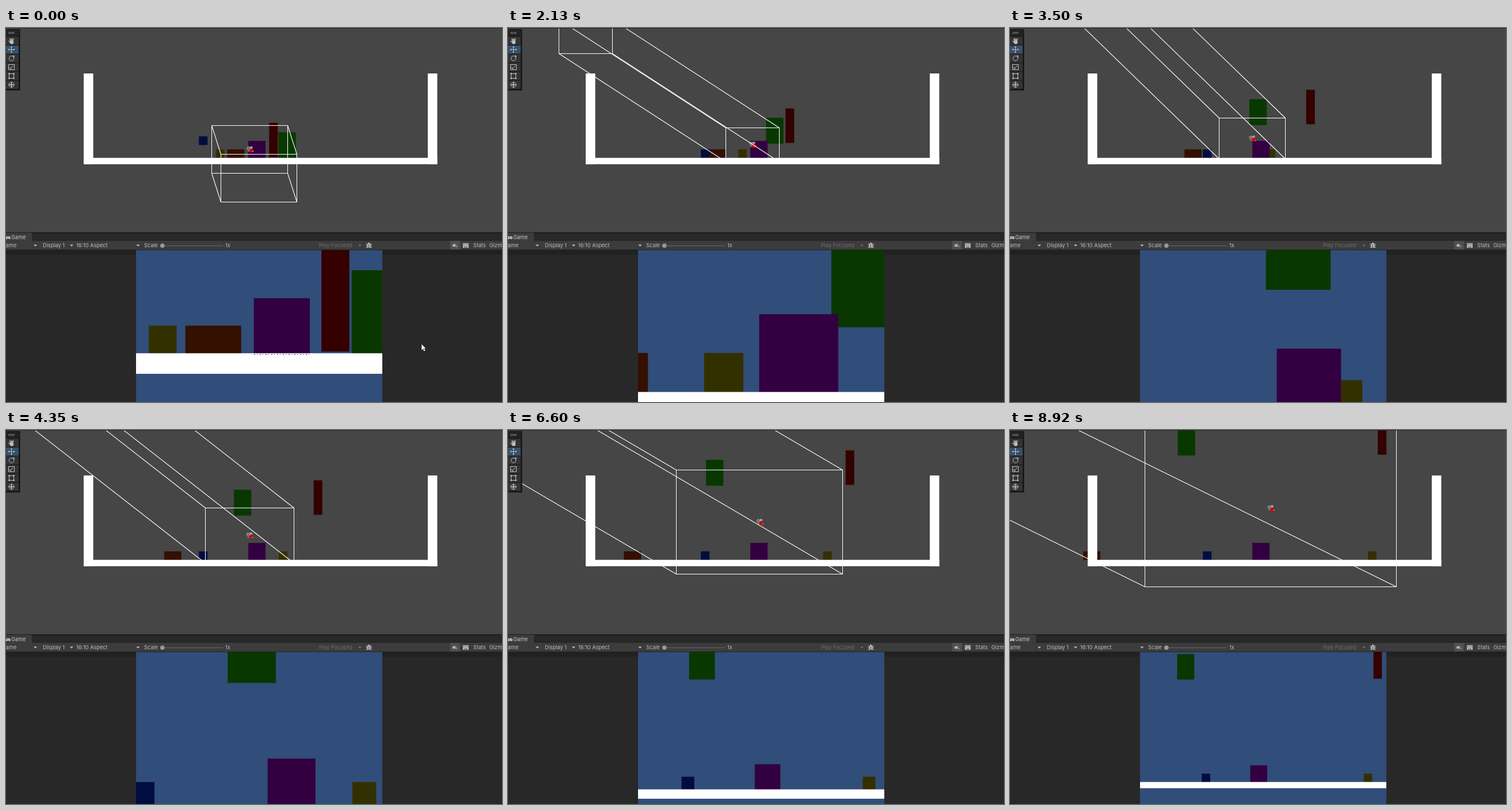
An HTML page with a canvas that plays this animation: 862 by 650 pixels, repeating every 8.96 s.

```html
<!DOCTYPE html>
<html lang="en">
<head>
<meta charset="utf-8">
<title>Camera follow</title>
<style>
  html, body { margin: 0; width: 100%; height: 100%; overflow: hidden; background: #282828; }
  canvas { display: block; }
</style>
</head>
<body>
<canvas id="stage" width="862" height="650"></canvas>
<script>
const ctx = document.getElementById('stage').getContext('2d');
const LOOP = 8960, HOLD = 1120, START = 1085;
const SPRITE_DEPTH = 0.01; // share of the far-plane shift seen at the sprites
const INK = '#bdbdbd', DIM = '#6d6d6d', BAR = '#3c3c3c';

// falls from 1 to 0 over about `span` ms; a higher power starts more gently
const fade = (t, span, power) => Math.exp(-((t / span) ** power));

// The camera settles into a steady drift and zoom that trail the moving blocks.
function pose(time) {
  const t = time < HOLD ? 0 : time - START;
  const travel = t * (0.034 - 1.5e-7 * t);
  return {
    travel,
    x: 399 + 0.21 * travel + 24.8 * fade(t, 1900, 2),
    y: 218.5 - 0.321 * travel - 7.5 * fade(t, 1400, 2),
    width: 2 * travel - 78.5 + 210.5 * fade(t, 1370, 1.15),
    dx: -910 + 926 * fade(t, 2137, 1.28),
    dy: -678 + 0.0296 * t + 728 * fade(t, 1354, 3)
  };
}

function box(x, y, w, h, color) {
  ctx.fillStyle = color;
  ctx.fillRect(x, y, w, h);
}

function clipped(x, y, w, h, paint) {
  ctx.save();
  ctx.beginPath();
  ctx.rect(x, y, w, h);
  ctx.clip();
  paint();
  ctx.restore();
}

function stroke(points, color, width = 1) {
  ctx.beginPath();
  points.forEach(([x, y]) => ctx.lineTo(x, y));
  ctx.strokeStyle = color;
  ctx.lineWidth = width;
  ctx.stroke();
}

function fill(points, color) {
  ctx.beginPath();
  points.forEach(([x, y]) => ctx.lineTo(x, y));
  ctx.fillStyle = color;
  ctx.fill();
}

function disc(x, y, r, color) {
  ctx.beginPath();
  ctx.arc(x, y, r, 0, 7);
  ctx.fillStyle = color;
  ctx.fill();
}

function ring(x, y, r, color) {
  ctx.beginPath();
  ctx.arc(x, y, r, 0, 7);
  ctx.strokeStyle = color;
  ctx.lineWidth = 1;
  ctx.stroke();
}

function label(text, x, color = INK, y = 381.3) {
  ctx.font = '9.2px Inter, Arial, sans-serif';
  ctx.fillStyle = color;
  ctx.fillText(text, x, y);
}

function world(travel) {
  const diag = travel * Math.SQRT1_2;
  box(457.3 + diag, 164.8 - diag, 15, 60, '#340000');
  box(473.5 - diag, 181.2 - diag, 30.2, 45, '#083800');
  box(364.8 + travel, 210.9, 14.9, 15, '#333000');
  box(384.4 - travel, 210.9, 29.9, 15, '#331000');
  box(335.2, Math.min(188.4 + travel, 210.9), 15, 15, '#000d40');
  box(421.1, 196.2, 30, 30, '#320040');
  box(135, 225.7, 614.5, 11, '#fff');
  box(135, 79, 16.6, 157.7, '#fff');
  box(733, 79, 16.5, 157.7, '#fff');
}

function frustum({ x, y, width, dx, dy }) {
  const snap = v => Math.round(v - 0.5) + 0.5;
  const corners = (cx, cy) => [[-1, -1], [1, -1], [1, 1], [-1, 1]]
    .map(([i, j]) => [snap(cx + i * width / 2), snap(cy + j * width / 3.2)]);
  const near = corners(x, y), far = corners(x + dx, y + dy);
  stroke([...near, near[0]], '#fff');
  stroke([...far, far[0]], '#fff');
  near.forEach((p, i) => stroke([p, far[i]], '#fff', 1.1));
}

function cameraIcon(x, y) {
  disc(x - 3, y - 2, 3, '#8d8d8d');
  disc(x + 2, y - 3, 2.4, '#a5a5a5');
  box(x - 4, y - 1, 6, 5, '#777');
  disc(x - 3, y - 2, 1, '#444');
  fill([[x - 2, y + 2], [x + 2, y - 2], [x + 6, y + 1], [x + 5, y + 4], [x + 1, y + 6]], '#d80000');
  box(x + 4, y + 3, 2, 1, '#ddd');
}

function cross(x, y, r, color) {
  stroke([[x - r, y], [x + r, y]], color);
  stroke([[x, y - r], [x, y + r]], color);
}

function toolStrip() {
  const ink = '#bebebe', x = 9.5, row = i => 22.2 + i * 15.3;
  box(0, 2, 24.5, 106.5, '#151515');
  box(0, 3, 23, 11, '#222');
  box(4, 7, 11, 1, '#777');
  box(4, 9, 11, 1, '#777');
  for (let i = 0; i < 6; i++) box(0, row(i) - 7.2, 22, 14.3, i === 1 ? '#36516c' : '#343434');
  // hand
  disc(x + 0.5, row(0) + 2.5, 3.2, ink);
  for (let i = 0; i < 4; i++) stroke([[x - 1 + i, row(0) + 2], [x - 3 + i * 2.2, row(0) - 4]], ink, 1.3);
  stroke([[x - 1, row(0) + 4], [x - 5, row(0)]], ink, 1.3);
  // move
  cross(x, row(1), 5, ink);
  for (let i = 0; i < 4; i++) {
    ctx.save();
    ctx.translate(x, row(1));
    ctx.rotate(i * Math.PI / 2);
    fill([[6, 0], [4, -2], [4, 2]], ink);
    ctx.restore();
  }
  // rotate
  ring(x, row(2), 4.2, ink);
  fill([[x + 2, row(2) - 5], [x + 5, row(2) - 5], [x + 5, row(2) - 1]], ink);
  // scale
  ctx.strokeRect(4.5, 63.5, 10, 9);
  ctx.strokeRect(4.5, 69.5, 4, 3);
  stroke([[9, 69], [12.5, 65.5]], ink);
  // rect
  ctx.strokeRect(5.5, 79.5, 8, 8);
  for (const cx of [5.5, 13.5]) for (const cy of [79.5, 87.5]) disc(cx, cy, 1.4, ink);
  // transform
  ring(x, row(5), 4.5, ink);
  cross(x, row(5), 5.5, ink);
  ring(x, row(5), 1.8, ink);
}

function gameBar() {
  const arrow = (x, color = INK) => fill([[x - 3, 376.5], [x + 3, 376.5], [x, 379.8]], color);
  box(0, 355, 862, 15, '#282828');
  box(0, 355, 862, 2, '#1c1c1c');
  box(0, 357, 45, 13, BAR);
  box(0, 356, 45, 1, '#28425c');
  box(0, 370, 862, 15, BAR);
  box(0, 385, 862, 1, '#232323');
  // gamepad
  box(0, 362, 7, 4, INK);
  disc(1, 365, 2, INK);
  disc(6, 365, 2, INK);
  box(1, 363, 2, 1, BAR);
  box(5, 363, 1, 1, BAR);
  label('Game', 9, '#c8c8c8', 367.3);
  label('Game', -7);
  label('Display 1', 64);
  label('16:10 Aspect', 122);
  label('Scale', 240);
  label('1x', 381);
  label('Play Focused', 544, DIM);
  label('Stats', 812);
  label('Gizmos', 840);
  [51, 114, 229.5].forEach(x => arrow(x));
  arrow(615, DIM);
  box(272, 378, 105, 1, '#686868');
  disc(271.8, 378.3, 3.8, '#999');
  // bug
  disc(630.7, 378.5, 3.2, INK);
  disc(630.7, 374.7, 1.8, INK);
  for (let y = 375.5; y < 382; y += 3) stroke([[625.5, y], [636, y]], INK);
  stroke([[630.5, 376], [630.5, 382]], BAR);
  // mute
  box(772, 370, 17, 15, '#505050');
  box(776, 376.5, 2, 3, INK);
  fill([[777, 377], [780.5, 374.5], [780.5, 381], [777, 379]], INK);
  stroke([[782, 376], [782, 380]], INK);
  stroke([[783, 381], [785, 379]], INK);
  // keyboard
  box(794, 374, 10, 8, INK);
  for (let i = 0; i < 8; i++) box(795 + (i % 4) * 2.3, i < 4 ? 375 : 377, 1, 1, BAR);
  box(796, 380, 6, 1, BAR);
}

function pointer(x, y) {
  const tip = [x, y];
  stroke([[x + 3, y + 7], [x + 5.5, y + 12]], '#fff', 2.2);
  const head = [tip, [x, y + 11.5], [x + 3, y + 8.8], [x + 8, y + 8.2], tip];
  fill(head, '#fff');
  stroke(head, '#111', 0.6);
}

function sceneView(view) {
  box(0, 0, 862, 355, '#464646');
  world(view.travel);
  cameraIcon(view.x + 0.5, view.y);
  frustum(view);
  box(0, 0, 862, 1, '#2a2a2a');
  toolStrip();
}

function gameView({ travel, x, y, width, dx, dy }) {
  const zoom = 428 / width;
  box(226, 386, 428, 264, '#314d79');
  ctx.translate(440, 519.25);
  ctx.scale(zoom, zoom);
  ctx.translate(-x - dx * SPRITE_DEPTH, -y - dy * SPRITE_DEPTH);
  world(travel);
}

function draw(time) {
  const view = pose(time);
  box(0, 0, 862, 650, '#282828');
  clipped(0, 0, 862, 355, () => sceneView(view));
  gameBar();
  box(0, 386, 862, 8, '#212121');
  clipped(226, 386, 428, 264, () => gameView(view));
  if (time < HOLD) {
    ctx.setLineDash([2, 3, 1, 4]);
    stroke([[431, 567.5], [527, 567.5]], '#320040');
    ctx.setLineDash([]);
  }
  if (time < 750) pointer(722, 549);
  else if (time < 800) pointer(751, 548);
}

function tick(now) {
  draw(now % LOOP);
  requestAnimationFrame(tick);
}
draw(0);
requestAnimationFrame(tick);
</script>
</body>
</html>
```
